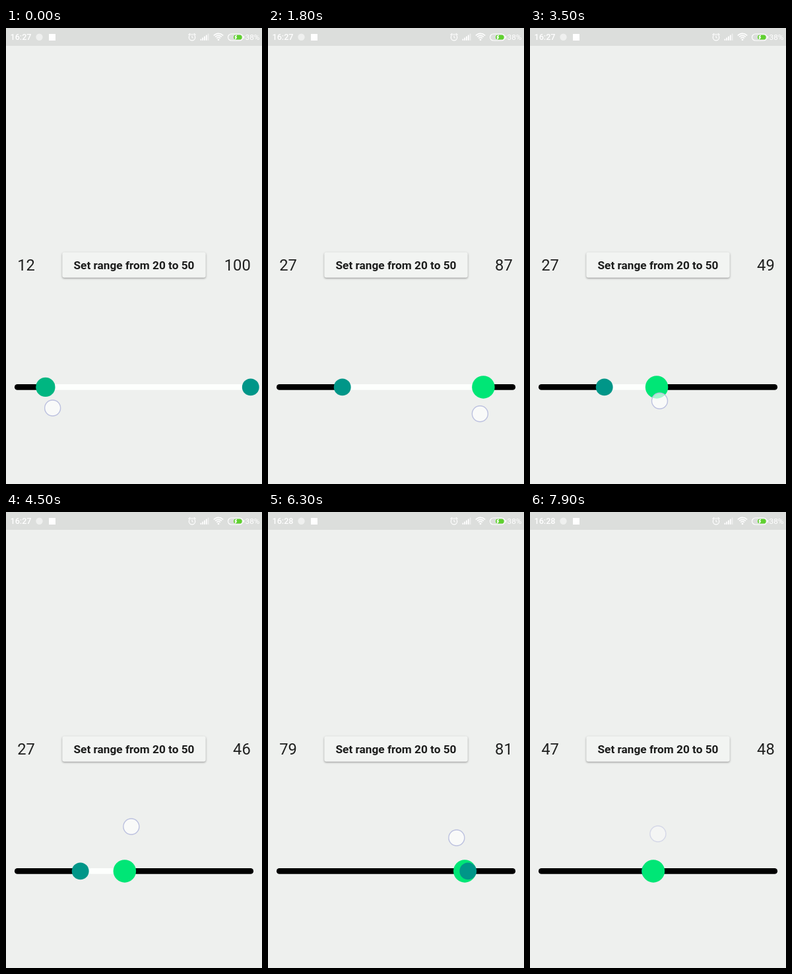
An HTML page with a canvas that plays this animation: 388 px wide and 690 px high, repeating every 8000 ms.

```html
<!DOCTYPE html>
<html lang="en">
<head>
<meta charset="utf-8">
<title>Range slider</title>
<style>
html, body { margin: 0; width: 100%; height: 100%; overflow: hidden; background: #eef0ee; }
canvas { display: block; width: 388px; height: 690px; }
</style>
</head>
<body>
<canvas id="stage"></canvas>
<script>
const W = 388, H = 690, LOOP = 8000;
const DP = W / 360;
const MARGIN = 16 * DP, TRACK_Y = 543.4, ROW_Y = 358.7;
const GAP = 1.4;     // least distance between the two values
const FADE = 220, GROW = 250;
const FONT = 'Roboto, "Noto Sans", sans-serif';

const canvas = document.getElementById('stage');
const ctx = canvas.getContext('2d');
const dpr = window.devicePixelRatio || 1;
canvas.width = W * dpr;
canvas.height = H * dpr;

// Where each thumb is dragged: [time, value]
const LOW = [[0, 12], [680, 27], [5222, 27], [6400, 79.6], [6850, 58]];
const HIGH = [[1500, 100], [4500, 46], [7300, 46], [7300, 81], [7760, 48]];

// Finger contacts: dx is the lead over the thumb, dip bows the path downwards
const TOUCHES = [
  { thumb: 'low', down: -100, up: 900, dx: [12, 0], y: [575, 585], dip: 0 },
  { thumb: 'high', down: 1450, up: 4500, dx: [-7, 10], y: [575, 476], dip: 22 },
  { thumb: 'low', down: 4900, up: 6850, dx: [-16, -11], y: [487, 503], dip: 0 },
  { thumb: 'high', down: 7300, up: 7800, dx: [7, 7], y: [487, 487], dip: 0 }
];
const LAST_GRAB = TOUCHES[3].down;

const clamp = p => Math.min(1, Math.max(0, p));
const mix = (a, b, p) => a + (b - a) * p;
const easeOut = p => 1 - (1 - p) ** 2.5;
const toX = v => mix(MARGIN, W - MARGIN, v / 100);

function valueAt(keys, t) {
  const next = keys.findIndex(k => t < k[0]);
  if (next === 0) return keys[0][1];
  if (next < 0) return keys[keys.length - 1][1];
  const [t0, a] = keys[next - 1], [t1, b] = keys[next];
  return mix(a, b, easeOut((t - t0) / (t1 - t0)));
}

// Highest value reached so far
function peakAt(keys, t) {
  const past = keys.filter(k => k[0] <= t).map(k => k[1]);
  return Math.max(valueAt(keys, t), ...past);
}

// Each thumb pushes the other ahead of it
function valuesAt(t) {
  const low = valueAt(LOW, t), high = valueAt(HIGH, t);
  return t < LAST_GRAB
    ? { low, high: Math.max(high, peakAt(LOW, t) + GAP) }
    : { low: Math.min(low, high - GAP), high };
}

// 0 = resting, 1 = fully grown
function grownAt(thumb, t) {
  return Math.max(...TOUCHES.filter(c => c.thumb === thumb).map(c =>
    clamp(Math.min((t - c.down) / GROW, 1 - (t - c.up - FADE) / FADE))));
}

function text(str, x, size, weight, color, align, middle) {
  ctx.font = `${weight} ${size}px ${FONT}`;
  ctx.fillStyle = color;
  ctx.textAlign = align;
  ctx.fillText(str, x, middle + size * .342);
}

function disc(x, y, r, color) {
  ctx.fillStyle = color;
  ctx.beginPath();
  ctx.arc(x, y, r, 0, Math.PI * 2);
  ctx.fill();
}

function arc(x, y, r, color, width, from = 0, to = Math.PI * 2) {
  ctx.strokeStyle = color;
  ctx.lineWidth = width;
  ctx.beginPath();
  ctx.arc(x, y, r, from, to);
  ctx.stroke();
}

function box(x, y, w, h, r, color) {
  ctx.fillStyle = color;
  ctx.beginPath();
  ctx.roundRect(x, y, w, h, r);
  ctx.fill();
}

function line(x0, y0, x1, y1, color, width, cap = 'butt') {
  ctx.strokeStyle = color;
  ctx.lineWidth = width;
  ctx.lineCap = cap;
  ctx.beginPath();
  ctx.moveTo(x0, y0);
  ctx.lineTo(x1, y1);
  ctx.stroke();
}

function alarm(x, y) {
  arc(x, y, 4.7, '#fff', 1.2);
  line(x, y - 3, x, y + .5, '#fff', 1);
  line(x, y, x + 2, y + 1.2, '#fff', 1);
  for (const side of [-1, 1]) {
    line(x + side * 5.5, y - 3.7, x + side * 2.7, y - 6, '#fff', 1.2);
  }
}

function signal(x, bottom) {
  for (let i = 0; i < 5; i++) {
    const h = 2.2 + i * 2;
    ctx.fillStyle = i < 4 ? '#fff' : 'rgba(255,255,255,.5)';
    ctx.fillRect(x + i * 2.8, bottom - h, 1.8, h);
  }
}

function wifi(x, y) {
  for (let r = 3.8; r < 10; r += 3) {
    arc(x, y, r, '#fff', 1.6, -Math.PI * .76, -Math.PI * .24);
  }
  disc(x, y - .4, 1.4, '#fff');
}

function battery(x, y) {
  ctx.strokeStyle = '#fff';
  ctx.lineWidth = 1.2;
  ctx.beginPath();
  ctx.roundRect(x, y, 22.5, 10, 5);
  ctx.stroke();
  box(x + 23.3, y + 3, 1.3, 4, 0, '#fff');
  box(x + 8.5, y + 1.4, 12.7, 7.2, 3.6, '#5fd12f');
  line(x + 13, y + 1.8, x + 10.6, y + 5, '#fff', 1.6);
  line(x + 10.2, y + 5, x + 13.4, y + 5, '#fff', 1.2);
  line(x + 13, y + 5, x + 10.6, y + 8.2, '#fff', 1.6);
}

function statusBar(t) {
  box(0, 0, W, 27, 0, '#dcdedc');
  text(t < TOUCHES[2].down ? '16:27' : '16:28', 6.5, 12.6, 500, '#fff', 'left', 14);
  disc(50.5, 13.8, 5.2, 'rgba(255,255,255,.55)');
  box(65, 9, 10, 10, 0, '#fff');
  alarm(282, 14.2);
  signal(294.5, 18.8);
  wifi(322, 18.2);
  battery(336.5, 9);
  text('38%', 384.5, 11.8, 400, '#fff', 'right', 14.2);
}

function button() {
  ctx.save();
  ctx.shadowColor = 'rgba(0,0,0,.36)';
  ctx.shadowBlur = 3 * dpr;
  ctx.shadowOffsetY = 1.2 * dpr;
  box(85.3, 339.3, 217.4, 38.4, 3, '#f2f4f2');
  ctx.restore();
  text('Set range from 20 to 50', W / 2, 16 * DP, 700, '#1c1d1c', 'center', ROW_Y);
}

function track(from, to, color, cap) {
  line(toX(from), TRACK_Y, toX(to), TRACK_Y, color, 8 * DP, cap);
}

function thumb(value, grown) {
  const color = `rgb(0,${mix(150, 230, grown)},${mix(136, 118, grown)})`;
  disc(toX(value), TRACK_Y, mix(12, 16, grown) * DP, color);
}

function touch(c, t, values) {
  if (t < c.down || t > c.up + FADE) return;
  const p = clamp((t - c.down) / (c.up - c.down));
  const x = toX(values[c.thumb]) + mix(...c.dx, p);
  const y = mix(...c.y, p ** 3) + c.dip * 4 * p * (1 - p);
  ctx.globalAlpha = 1 - clamp((t - c.up) / FADE);
  disc(x, y, 12, 'rgba(255,255,255,.65)');
  arc(x, y, 12, '#bcc1df', 1.4);
  ctx.globalAlpha = 1;
}

function draw(t) {
  const values = valuesAt(t), { low, high } = values;
  ctx.setTransform(dpr, 0, 0, dpr, 0, 0);
  box(0, 0, W, H, 0, '#eef0ee');
  statusBar(t);
  button();
  text(Math.round(low), MARGIN, 22 * DP, 400, '#202120', 'left', ROW_Y);
  text(Math.round(high), W - MARGIN, 22 * DP, 400, '#202120', 'right', ROW_Y);

  track(0, low, '#000', 'round');
  track(high, 100, '#000', 'round');
  track(low, high, '#fdfffd', 'butt');
  thumb(low, grownAt('low', t));
  thumb(high, grownAt('high', t));
  TOUCHES.forEach(c => touch(c, t, values));
}

const start = performance.now();
function tick() {
  draw((performance.now() - start) % LOOP);
  requestAnimationFrame(tick);
}
tick();
</script>
</body>
</html>
```
